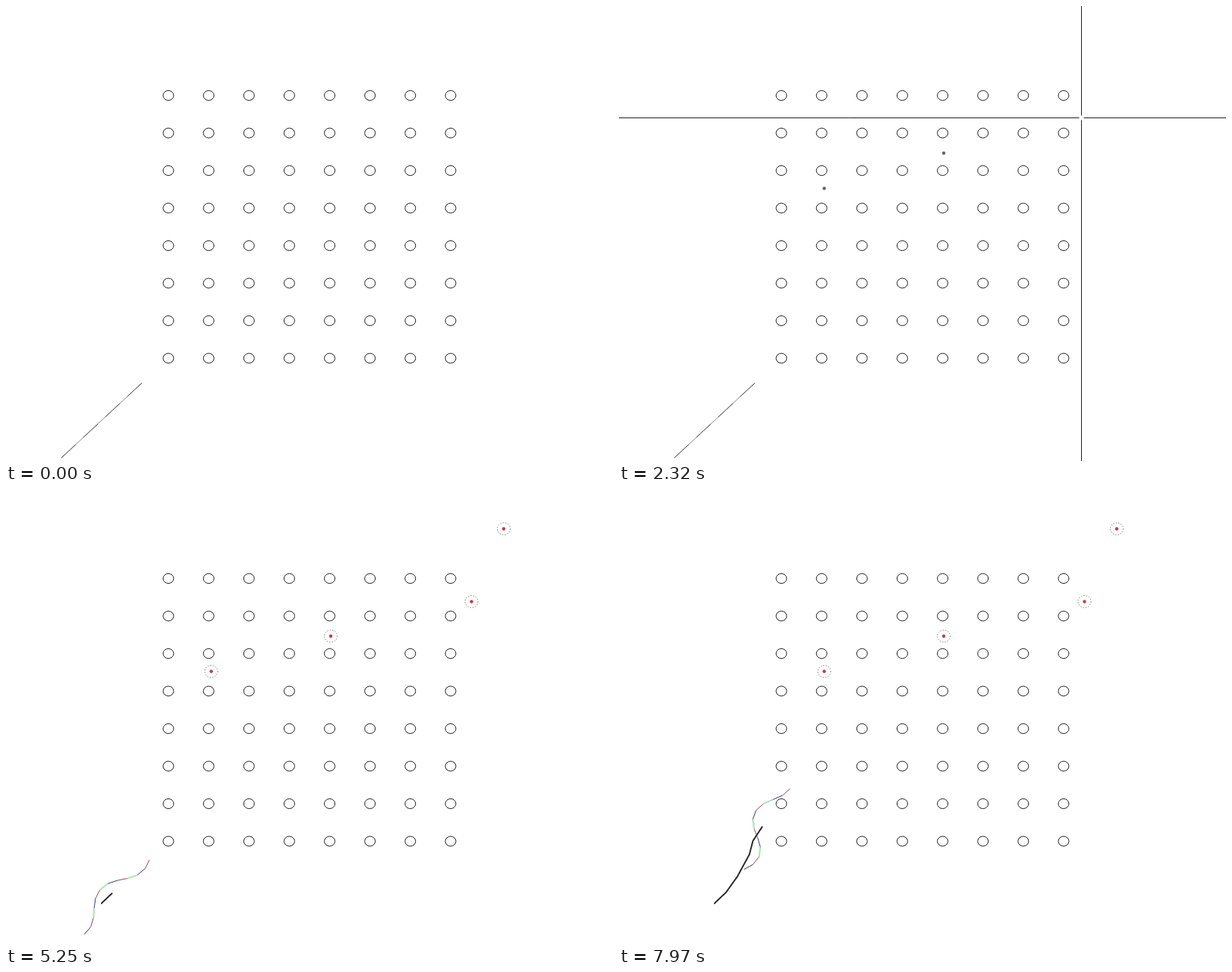
Animation, 800 px wide and 600 px high, one loop 8 s. Source, as an HTML page with a canvas:

```html
<!DOCTYPE html>
<html lang="en">
<head>
<meta charset="utf-8">
<title>Snake robot</title>
<style>
html, body { margin: 0; width: 100%; height: 100%; overflow: hidden; background: #fff; }
canvas { display: block; }
</style>
</head>
<body>
<canvas id="stage" width="800" height="600"></canvas>
<script>
const ctx = document.getElementById('stage').getContext('2d');
const TAU = 2 * Math.PI, INK = '#222';
const LOOP = 8000, CROSS_ON = 820, CROSS_OFF = 3770, RUN = 3928, STEP = 77.5;
const LINKS = 11, WAVE = 9.4, LINK_X = 13.65, LINK_Y = 12.7;

// Waypoints and the moment each one is clicked
const targets = [
  { x: 270.5, y: 240.5, at: 1450 },
  { x: 428, y: 194, at: 2000 },
  { x: 613.5, y: 148.5, at: 2610 },
  { x: 656, y: 52.5, at: 3770 }
];

// Cursor strokes: start time, ticks, and a quadratic curve
const strokes = [
  { at: CROSS_ON, ticks: 7, from: [404, 330], bend: [337, 285], to: [270, 240] },
  { at: 1450, ticks: 6, from: [270, 240], bend: [472, 92], to: [428, 194] },
  { at: 2000, ticks: 6, from: [428, 194], bend: [617, 140], to: [613, 148] }
];

// Drift of the centre of mass: step, x, y
const drift = [
  [0, 126, 546.5], [8, 126.7, 545.5], [18, 141, 532], [28, 156, 511],
  [38, 171.8, 482], [45, 176.5, 464], [52, 188.7, 445.5]
];

const mix = (a, b, f) => a + (b - a) * f;

function centre(n) {
  const i = Math.max(1, drift.findIndex(k => k[0] >= n));
  const [a, b] = [drift[i - 1], drift[i]];
  const f = (n - a[0]) / (b[0] - a[0]);
  return [mix(a[1], b[1], f), mix(a[2], b[2], f)];
}

// Heading of link i in degrees: a wave running from head to tail around a turning course
function heading(n, i) {
  const course = 45 + 28 * Math.sin(Math.PI * n / 84) ** 3.5;
  const swing = 44 * Math.min(1, n / 20);
  const trough = 7.2 - 0.59 * n + 0.0014 * n * n;
  return course - swing * Math.cos(TAU * (i - trough) / WAVE);
}

// Joints from tail to head, balanced around the centre of mass
function joints(n) {
  const pts = [[0, 0]];
  for (let i = 0; i < LINKS; i++) {
    const [x, y] = pts[i], h = heading(n, i) * TAU / 360;
    pts.push([x + LINK_X * Math.cos(h), y - LINK_Y * Math.sin(h)]);
  }
  const mean = k => pts.reduce((sum, p) => sum + p[k], 0) / pts.length;
  const [cx, cy] = centre(n), mx = mean(0), my = mean(1);
  return pts.map(([x, y]) => [x - mx + cx, y - my + cy]);
}

function line(pts, color, width) {
  ctx.beginPath();
  pts.forEach(p => ctx.lineTo(...p));
  ctx.strokeStyle = color;
  ctx.lineWidth = width;
  ctx.stroke();
}

function ring(x, y, rx, ry, color) {
  ctx.beginPath();
  ctx.ellipse(x, y, rx, ry, 0, 0, TAU);
  ctx.strokeStyle = color;
  ctx.lineWidth = 1;
  ctx.stroke();
}

function dot(x, y, r, color) {
  ctx.beginPath();
  ctx.arc(x, y, r, 0, TAU);
  ctx.fillStyle = color;
  ctx.fill();
}

function cursor(t) {
  const { at, ticks, from, bend, to } = strokes.findLast(s => t >= s.at);
  const u = Math.min(1, (Math.floor((t - at) / 76) + 1) / ticks);
  return [0, 1].map(k =>
    Math.round(mix(mix(from[k], bend[k], u), mix(bend[k], to[k], u), u)));
}

function drawCross(t) {
  const [x, y] = cursor(t).map(v => v + 0.5), gap = 3;
  line([[0, y], [x - gap, y]], INK, 1);
  line([[x + gap, y], [800, y]], INK, 1);
  line([[x, 0], [x, y - gap]], INK, 1);
  line([[x, y + gap], [x, 600]], INK, 1);
}

function drawTargets(t, running) {
  for (const { x, y } of targets.filter(p => t >= p.at)) {
    if (running) {
      ctx.setLineDash([1.2, 2.2]);
      ring(x, y, 8.5, 8, '#4a704a');
      ctx.setLineDash([]);
    }
    dot(x, y, 2.2, running ? '#c43c42' : '#666');
  }
}

function drawSnake(n, running) {
  const pts = joints(n);
  const colors = running ? ['#a04450', '#38387c', '#b0e8b4'] : ['#333', '#333', '#888'];
  for (let i = 0; i < LINKS; i++) {
    const kind = (LINKS - 1 - i) % 3;
    line([pts[i], pts[i + 1]], colors[kind], running && kind === 2 ? 2.2 : 1);
  }
}

function drawTrail(n) {
  const pts = Array.from({ length: n + 1 }, (_, k) => centre(k));
  ctx.lineCap = ctx.lineJoin = 'round';
  line(pts, '#262626', 1.9);
  ctx.lineCap = 'butt';
}

function draw(t) {
  ctx.fillStyle = '#fff';
  ctx.fillRect(0, 0, 800, 600);
  for (let r = 0; r < 8; r++) {
    for (let c = 0; c < 8; c++) ring(214 + c * 53.14, 118 + r * 49.5, 7, 6.5, INK);
  }
  const running = t >= RUN;
  const n = running ? Math.floor((t - RUN) / STEP) : 0;
  drawTargets(t, running);
  drawSnake(n, running);
  if (n > 0) drawTrail(n);
  if (t >= CROSS_ON && t < CROSS_OFF) drawCross(t);
}

const begin = performance.now();
function frame() {
  draw((performance.now() - begin) % LOOP);
  requestAnimationFrame(frame);
}
frame();
</script>
</body>
</html>
```
